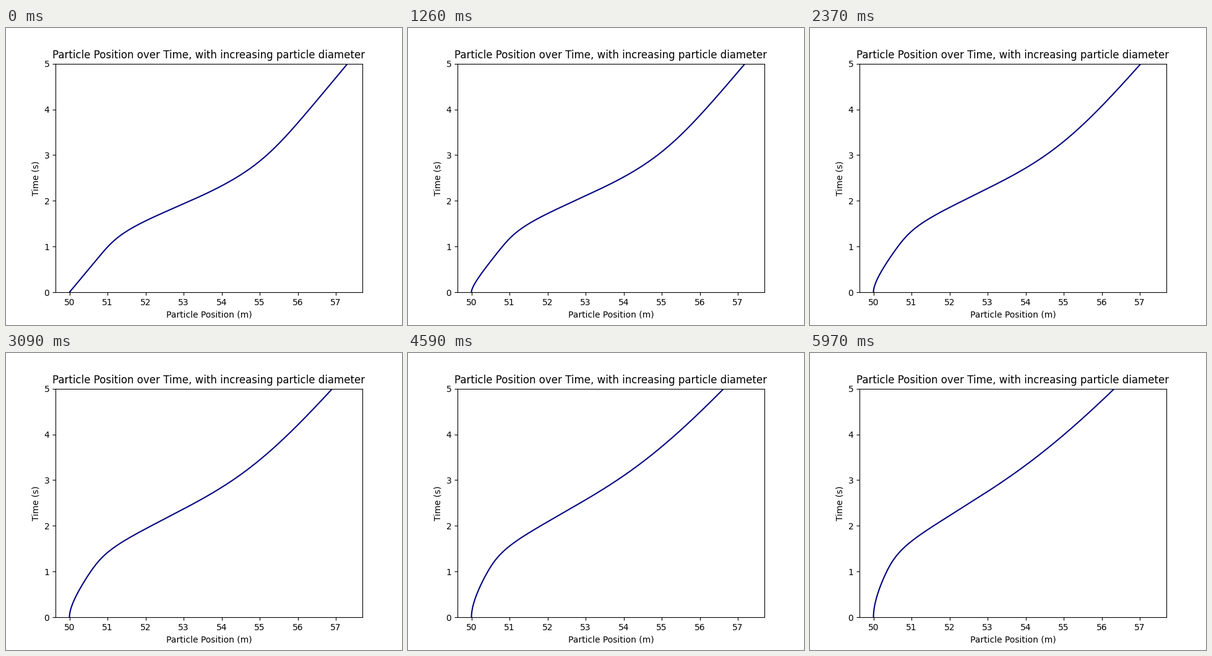
Write a matplotlib script that moves like this. It is 640 px wide and 480 px high and loops after 6000 ms.

```python
import numpy as np
import matplotlib.pyplot as plt
from matplotlib.animation import FuncAnimation

FRAMES = 200
T_END = 5.0
X0 = 50.0
DT = 0.0025

# Gust: a skewed pulse travelling to the right on a unit flow.
GUST, PEAK, WIDTH, WAVE_SPEED = 1.75, 1.583, 0.25, 10.0

# Drag of the largest particle: response time and Reynolds number per unit slip.
TAU, REYNOLDS = 25.0, 1870.0


def flow(x, t):
    s = np.maximum(t - (x - X0) / WAVE_SPEED, 1e-6)
    return 1 + GUST * np.exp(-0.5 * (np.log(s / PEAK) / WIDTH) ** 2)


def drag_rate(slip, d):
    """Schiller-Naumann drag, as the rate at which slip decays."""
    re = REYNOLDS * d * np.abs(slip)
    return (1 + 0.15 * re ** 0.687) / (TAU * d ** 2)


def simulate(d):
    """Paths of particles released from rest, one column per diameter."""
    times = np.arange(0, T_END + 0.06, DT)
    x = np.full(len(d), X0)
    v = np.zeros(len(d))
    path = [x]
    for t in times[1:]:
        u = flow(x, t)
        v_new = u + (v - u) * np.exp(-DT * drag_rate(v - u, d))
        x = x + DT * (v + v_new) / 2
        v = v_new
        path.append(x)
    return times, np.array(path)


diameters = np.maximum(np.arange(FRAMES) / (FRAMES - 1), 1e-3)
times, paths = simulate(diameters)

fig, ax = plt.subplots(figsize=(6.4, 4.8), dpi=100)
span = 7.332
ax.set_xlim(X0 - 0.05 * span, X0 + 1.05 * span)
ax.set_ylim(0, T_END)
ax.set_title("Particle Position over Time, with increasing particle diameter")
ax.set_xlabel("Particle Position (m)")
ax.set_ylabel("Time (s)")
line, = ax.plot(paths[:, 0], times, color="navy")


def update(n):
    line.set_xdata(paths[:, n])
    return line,


anim = FuncAnimation(fig, update, frames=FRAMES, interval=30,
                     repeat=True, repeat_delay=0)
plt.show()
```
